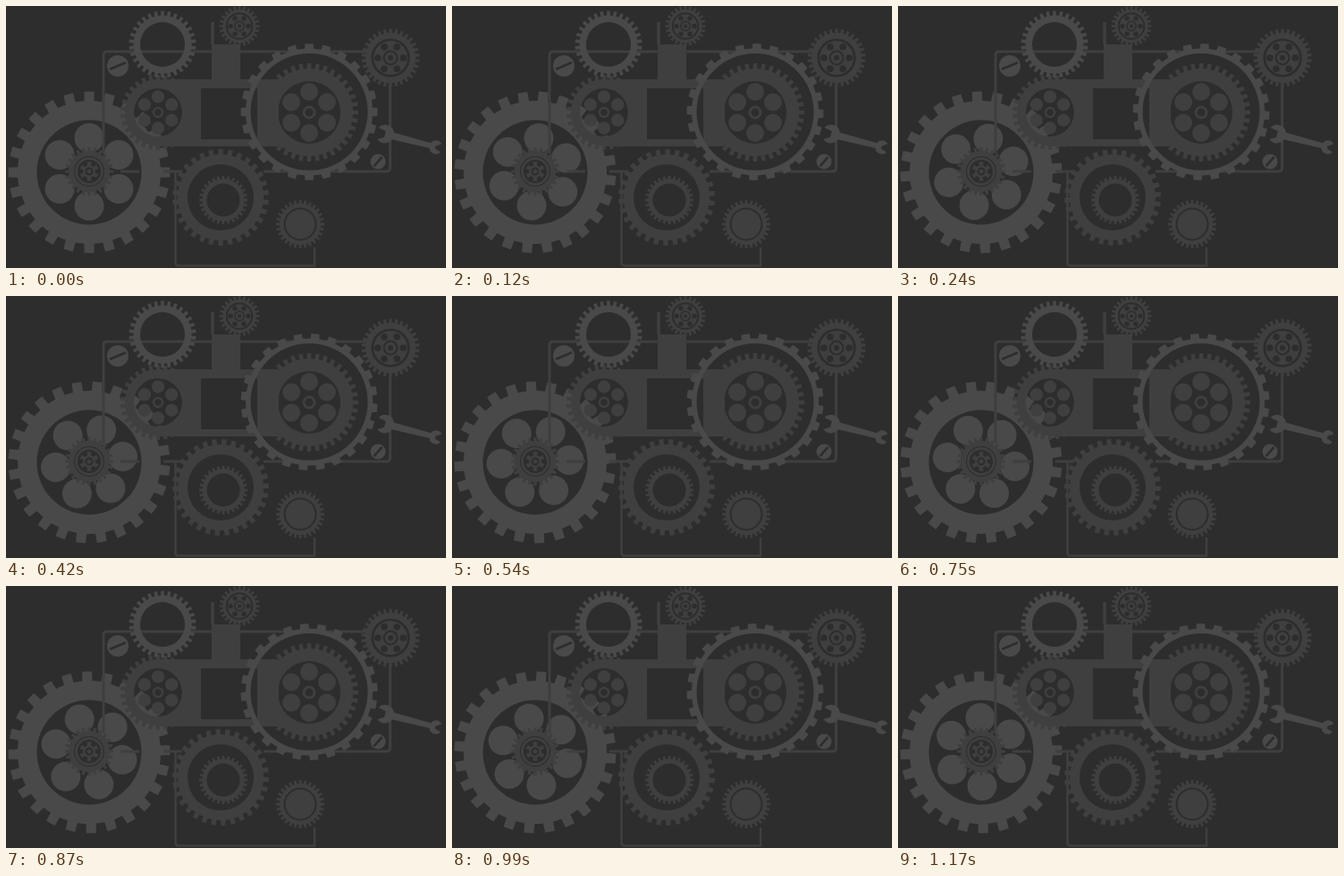
Write an HTML page with a canvas that moves like this. It is 492x293 px and loops after 1200 ms.

```html
<!DOCTYPE html>
<html lang="en">
<head>
<meta charset="utf-8">
<title>Gears</title>
<style>
html, body { margin: 0; height: 100%; overflow: hidden; background: #2d2d2d; }
canvas { display: block; }
</style>
</head>
<body>
<canvas id="stage" width="492" height="293"></canvas>
<script>
const ctx = document.getElementById('stage').getContext('2d');
const LOOP = 1200, STEP = 30, TAU = Math.PI * 2;
const BACK = '#2d2d2d', MID = '#3f3f3f', LIGHT = '#494949';

function disc(x, y, r, color) {
  ctx.fillStyle = color;
  ctx.beginPath();
  ctx.arc(x, y, r, 0, TAU);
  ctx.fill();
}

function circle(x, y, r, width, color) {
  ctx.strokeStyle = color;
  ctx.lineWidth = width;
  ctx.beginPath();
  ctx.arc(x, y, r, 0, TAU);
  ctx.stroke();
}

function line(d, width, color) {
  ctx.strokeStyle = color;
  ctx.lineWidth = width;
  ctx.stroke(new Path2D(d));
}

function shape(d, color) {
  ctx.fillStyle = color;
  ctx.fill(new Path2D(d), 'evenodd');
}

// Toothed wheel with an open centre; turn is in degrees.
function gear(x, y, tip, root, hole, teeth, color, turn = 0) {
  const pitch = TAU / teeth;
  ctx.beginPath();
  for (let i = 0; i < teeth; i++) {
    const mid = i * pitch - TAU / 4 + turn * TAU / 360;
    for (const [r, k] of [[root, -.27], [tip, -.23], [tip, .23], [root, .27]])
      ctx.lineTo(x + r * Math.cos(mid + k * pitch), y + r * Math.sin(mid + k * pitch));
    ctx.arc(x, y, root, mid + .27 * pitch, mid + .73 * pitch);
  }
  ctx.closePath();
  ctx.moveTo(x + hole, y);
  ctx.arc(x, y, hole, 0, TAU);
  ctx.fillStyle = color;
  ctx.fill('evenodd');
}

function petals(x, y, dist, r, color, turn = 0) {
  for (let i = 0; i < 6; i++) {
    const a = (i * 60 - 90 + turn) * TAU / 360;
    disc(x + dist * Math.cos(a), y + dist * Math.sin(a), r, color);
  }
}

function rosette(x, y, s) {
  disc(x, y, 15 * s, MID);
  circle(x, y, 15 * s, 2 * s, BACK);
  petals(x, y, 10.5 * s, 2.8 * s, BACK, 30);
  circle(x, y, 5.5 * s, 1.5 * s, BACK);
  disc(x, y, 2.2 * s, BACK);
}

function screw(x, y, r, angle) {
  disc(x, y, r, LIGHT);
  ctx.save();
  ctx.translate(x, y);
  ctx.rotate(angle);
  ctx.fillStyle = BACK;
  ctx.fillRect(-r * .8, -1.3, r * 1.6, 2.6);
  ctx.restore();
}

function wrench() {
  ctx.save();
  ctx.translate(424, 143);
  ctx.rotate(.255);
  shape('M-9 -5A10 10 0 0 1 9 -4L52 -3A7 7 0 0 1 64 -5L58 -1V2L65 4A7 7 0 0 1 52 3L9 4A10 10 0 0 1 -7 8L0 4V-3Z', LIGHT);
  ctx.restore();
}

function draw(now) {
  const p = Math.floor(now % LOOP / STEP) * STEP / LOOP;
  ctx.fillStyle = BACK;
  ctx.fillRect(0, 0, 492, 293);

  gear(93, 186, 90.5, 80, 58.5, 24, LIGHT, 60 * p);
  petals(93, 185.5, 38, 16.5, LIGHT, 60 * p);

  line('M109 165V55Q109 51 113 51H405M429.5 86V181Q429.5 185 425 185H288M128 185H149M176 185H197', 3, MID);
  line('M189.500 185V287Q189.500 290.500 193 290.500H345V270', 2.5, MID);

  shape('M230 43H262V82H305V157H170V146A27 27 0 0 0 170 92V82H230ZM218 92V149H281V92Z', MID);
  line('M231 43V18', 3.5, MID);
  gear(339, 118.5, 76.5, 71, 65.5, 24, LIGHT, 15 * p);

  gear(339, 119, 55, 49, 35, 36, MID);
  petals(339, 119, 23, 10, MID);
  circle(339, 119, 6, 3, MID);

  gear(170, 119, 42, 37, 27, 30, MID);
  petals(170, 119, 17.5, 7.2, MID);
  circle(170, 119, 5, 2.5, MID);

  gear(240, 214, 54, 48, 37, 30, MID, 12 * p);
  gear(243, 217, 27, 23.5, 18.5, 28, MID);

  gear(329, 244, 27, 23, 18.5, 28, MID);
  disc(329, 244, 16.5, MID);

  gear(175, 43, 37.5, 32.5, 25, 30, LIGHT);
  gear(261, 22.5, 22.5, 18.5, 14, 24, MID);
  rosette(261, 22.5, .95);
  gear(430, 58, 32.500, 28, 20, 30, MID);
  rosette(430, 58, 1.35);

  gear(93, 185, 27, 23, 17, 24, MID);
  circle(93, 185, 14.5, 3, MID);
  gear(93, 185, 11, 7, 4.5, 6, MID);
  disc(93, 185, 2.5, MID);

  screw(125, 67, 12, -.4);
  screw(416, 174, 8.5, -.85);
  wrench();
  requestAnimationFrame(draw);
}
requestAnimationFrame(draw);
</script>
</body>
</html>
```
